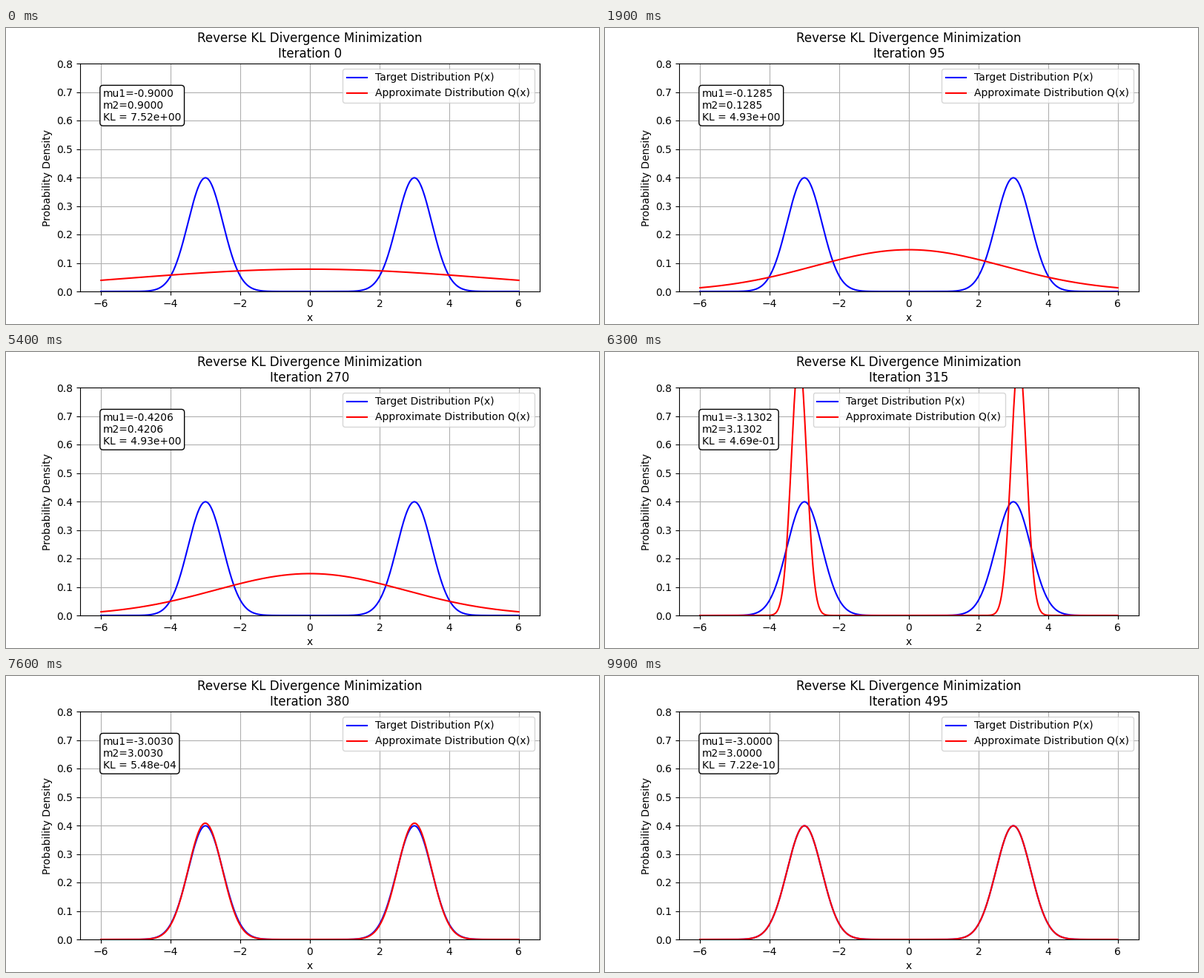
Write a matplotlib script that moves like this. It is 800x400 px and loops after 10 s.

```python
import numpy as np
import matplotlib.pyplot as plt
from matplotlib.animation import FuncAnimation

EPS = 1e-10
STEPS, STRIDE = 500, 5
TRUE_MU, TRUE_SIGMA = 3.0, 0.5


def normal(x, mu, sigma):
    return np.exp(-0.5 * ((x - mu) / sigma) ** 2) / (sigma * np.sqrt(2 * np.pi))


def mixture(x, mu, sigma):
    return 0.5 * (normal(x, -mu, sigma) + normal(x, mu, sigma))


def kl_and_grad(x, log_p, mu, sigma):
    """Reverse KL of the symmetric mixture and its gradient in (mu, log sigma)."""
    dx = x[1] - x[0]
    left, right = normal(x, -mu, sigma), normal(x, mu, sigma)
    a, b = (x + mu) / sigma, (x - mu) / sigma
    q = 0.5 * (left + right)
    ratio = np.log(q + EPS) - log_p
    weight = ratio + q / (q + EPS)
    dq_mu = 0.5 * (right * b - left * a) / sigma
    dq_log_sigma = 0.5 * (left * (a**2 - 1) + right * (b**2 - 1))
    grad = np.array([np.sum(dq_mu * weight), np.sum(dq_log_sigma * weight)]) * dx
    return np.sum(q * ratio) * dx, grad


def optimise(lr=0.1, beta1=0.9, beta2=0.999):
    """Adam descent; each entry is (mu, sigma, kl) before a step and mu after it."""
    x = np.linspace(-20, 20, 4001)
    log_p = np.log(mixture(x, TRUE_MU, TRUE_SIGMA) + EPS)
    theta = np.array([1.0, np.log(5.0)])
    m, v = np.zeros(2), np.zeros(2)
    history = []
    for t in range(1, STEPS + 1):
        mu, sigma = theta[0], np.exp(theta[1])
        kl, g = kl_and_grad(x, log_p, mu, sigma)
        m = beta1 * m + (1 - beta1) * g
        v = beta2 * v + (1 - beta2) * g**2
        m_hat, v_hat = m / (1 - beta1**t), v / (1 - beta2**t)
        theta = theta - lr * m_hat / (np.sqrt(v_hat) + 1e-8)
        history.append((mu, sigma, kl, theta[0]))
    return history


history = optimise()
xs = np.linspace(-6, 6, 1000)

fig, ax = plt.subplots(figsize=(8, 4), dpi=100)
ax.plot(xs, mixture(xs, TRUE_MU, TRUE_SIGMA), color="blue",
        label="Target Distribution P(x)")
(q_line,) = ax.plot(xs, mixture(xs, *history[0][:2]), color="red",
                    label="Approximate Distribution Q(x)")
ax.set_xlim(-6.6, 6.6)
ax.set_ylim(0, 0.8)
ax.set_xlabel("x")
ax.set_ylabel("Probability Density")
ax.grid(True)
ax.legend(loc="best")
title = ax.set_title("")
info = ax.text(0.05, 0.75, "", transform=ax.transAxes,
               bbox=dict(boxstyle="round,pad=0.3", facecolor="white", edgecolor="black"))


def update(frame):
    step = frame * STRIDE
    mu, sigma, kl, new_mu = history[step]
    q_line.set_ydata(mixture(xs, mu, sigma))
    title.set_text(f"Reverse KL Divergence Minimization\nIteration {step}")
    info.set_text(f"mu1={-new_mu:.4f}\nm2={new_mu:.4f}\nKL = {kl:.2e}")
    return q_line, title, info


anim = FuncAnimation(fig, update, frames=STEPS // STRIDE, interval=100,
                     repeat=True, repeat_delay=0, blit=False)
plt.show()
```
